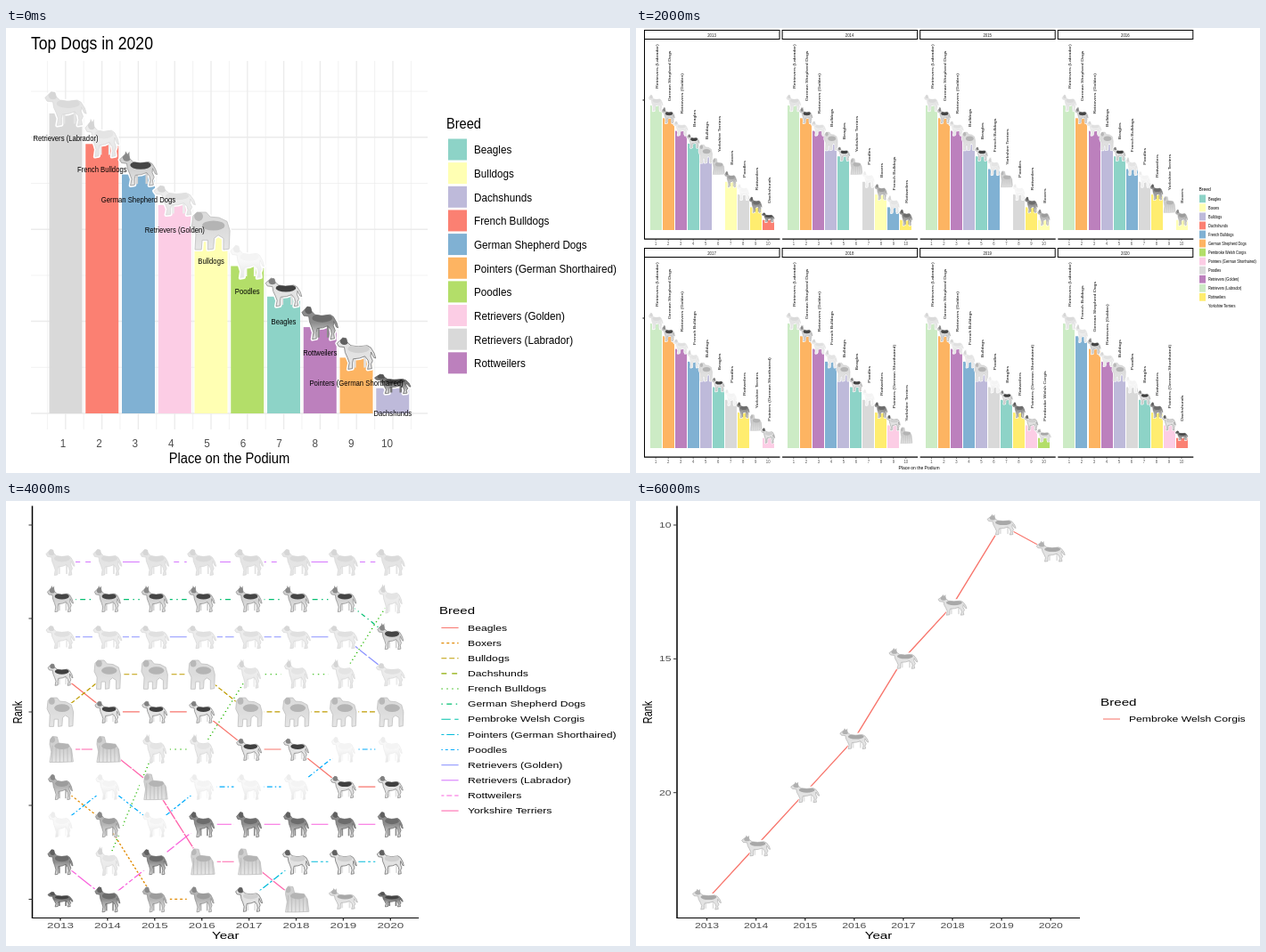
Write an HTML page with a canvas that moves like this. It is 700 px wide and 500 px high and loops after 8 s.

```html
<!DOCTYPE html>
<html lang="en">
<head>
<meta charset="utf-8">
<title>Top Dogs</title>
<style>
html, body { margin: 0; width: 100%; height: 100%; overflow: hidden; background: #fff; }
canvas { display: block; }
</style>
</head>
<body>
<canvas id="stage" width="700" height="500"></canvas>
<script>
const ctx = document.getElementById('stage').getContext('2d');
const GREY = '#4d4d4d';

// outlines in a unit box, facing left
const slim = [[0, .2], [.09, .1], [.15, .03], [.24, .05], [.27, .17], [.36, .27], [.55, .3], [.78, .27], [.87, .33],
  [.96, .5], [1, .66], [.95, .64], [.88, .47], [.87, .6], [.92, .74], [.88, .84], [.9, .98], [.79, 1], [.82, .84],
  [.8, .72], [.72, .6], [.58, .66], [.42, .68], [.4, .8], [.4, .98], [.29, 1], [.32, .8], [.27, .64], [.21, .48],
  [.19, .32], [.05, .3]];
const stocky = [[.05, .12], [.15, .02], [.38, .02], [.48, .14], [.7, .16], [.9, .26], [.97, .5], [.95, .98], [.81, 1],
  [.81, .7], [.68, .62], [.58, .7], [.56, .98], [.42, 1], [.42, .75], [.28, .75], [.26, 1], [.1, 1], [.12, .6], [.02, .4]];
const shaggy = [[.12, .12], [.2, 0], [.38, .02], [.44, .26], [.8, .3], [.92, .5], [.98, .98], [.5, 1], [.1, 1],
  [.16, .6], [.1, .3]];

const breeds = {
  B: { name: 'Beagles', w: 28, h: 25, coat: '#e2e2e2', saddle: '#404040', head: '#808080', line: '#F8766D', dash: '' },
  X: { name: 'Boxers', w: 27, h: 29, coat: '#b4b4b4', saddle: '#9c9c9c', head: '#888', line: '#E18A00', dash: '22' },
  U: { name: 'Bulldogs', w: 31, h: 33, coat: '#dcdcdc', saddle: '#b4b4b4', head: '#b8b8b8', body: stocky, line: '#BE9C00', dash: '42' },
  D: { name: 'Dachshunds', w: 28, h: 17, coat: '#777', saddle: '#444', head: '#555', line: '#8CAB00', dash: '44' },
  F: { name: 'French Bulldogs', w: 26, h: 31, coat: '#ececec', saddle: '#e4e4e4', head: '#d4d4d4', ears: 1, line: '#24B700', dash: '13' },
  G: { name: 'German Shepherd Dogs', w: 29, h: 28, coat: '#d2d2d2', saddle: '#454545', head: '#888', ears: 1, line: '#00BE70', dash: '1343' },
  C: { name: 'Pembroke Welsh Corgis', w: 32, h: 22, coat: '#e2e2e2', saddle: '#a8a8a8', head: '#b0b0b0', ears: 1, line: '#00C1AB', dash: '73' },
  P: { name: 'Pointers (German Shorthaired)', w: 30, h: 28, coat: '#e2e2e2', saddle: '#d0d0d0', head: '#606060', line: '#00BBDA', dash: '2262' },
  O: { name: 'Poodles', w: 26, h: 29, coat: '#f8f8f8', saddle: '#f4f4f4', head: '#ededed', line: '#00ACFC', dash: '12223242' },
  R: { name: 'Retrievers (Golden)', w: 32, h: 26, coat: '#ececec', saddle: '#e0e0e0', head: '#d6d6d6', line: '#8B93FF', dash: 'F282' },
  L: { name: 'Retrievers (Labrador)', w: 32, h: 30, coat: '#e4e4e4', saddle: '#dadada', head: '#d6d6d6', line: '#D575FE', dash: 'F4448444' },
  W: { name: 'Rottweilers', w: 28, h: 29, coat: '#8c8c8c', saddle: '#6c6c6c', head: '#606060', line: '#F962DD', dash: '224282F2' },
  Y: { name: 'Yorkshire Terriers', w: 30, h: 29, coat: '#d0d0d0', saddle: '#b4b4b4', head: '#b8b8b8', body: shaggy, line: '#FF65AC', dash: 'F1' }
};
const keys = Object.keys(breeds);
const set3 = ['#8DD3C7', '#FFFFB3', '#BEBADA', '#FB8072', '#80B1D3', '#FDB462',
  '#B3DE69', '#FCCDE5', '#D9D9D9', '#BC80BD', '#CCEBC5', '#FFED6F'];
// top ten of each year from 2013, best first
const ranking = ['LGRBUYXOWD', 'LGRUBYOXFW', 'LGRUBFYOWX', 'LGRUBFOWYX',
  'LGRFUBOWYP', 'LGRFUBOWPY', 'LGRFUOBWPC', 'LFGRUOBWPD'];

let ky = 1; // height-to-width ratio of type and strokes

function text(s, x, y, size, align = 'left', color = '#000', turn = 0) {
  ctx.save();
  ctx.translate(x, y);
  ctx.scale(1, ky);
  ctx.rotate(turn);
  ctx.font = `${size}px "Liberation Sans", Arial, sans-serif`;
  ctx.textAlign = align;
  ctx.fillStyle = color;
  ctx.fillText(s, 0, size * 0.36);
  ctx.restore();
}

function rect(x, y, w, h, color) {
  ctx.fillStyle = color;
  ctx.fillRect(x, y, w, h);
}

function line(pts, color, width = 1, dash = '') {
  ctx.save();
  ctx.scale(1, ky);
  ctx.strokeStyle = color;
  ctx.lineWidth = width;
  ctx.setLineDash([...dash].map(c => parseInt(c, 16) * width));
  ctx.beginPath();
  pts.forEach(([x, y]) => ctx.lineTo(x, y / ky));
  ctx.stroke();
  ctx.restore();
}

function oval(x, y, rx, ry, color) {
  ctx.fillStyle = color;
  ctx.beginPath();
  ctx.ellipse(x, y, rx, ry, 0, 0, 7);
  ctx.fill();
}

function dog(key, cx, cy, sx = 1, sy = 1, halo = 0) {
  const { coat, saddle, head, ears, body = slim, ...size } = breeds[key];
  const w = size.w * sx, h = size.h * sy;
  const X = u => cx + (u - .5) * w, Y = v => cy + (v - .5) * h;
  const outline = pts => {
    ctx.beginPath();
    pts.forEach(([u, v]) => ctx.lineTo(X(u), Y(v)));
    ctx.closePath();
  };
  ctx.save();
  ctx.lineJoin = 'round';
  if (halo) {
    outline(body);
    ctx.strokeStyle = '#fff';
    ctx.lineWidth = halo;
    ctx.stroke();
  }
  if (body === slim) {
    for (const u of [.43, .69]) rect(X(u), Y(.6), w * .06, h * .35, coat);
  }
  if (ears) {
    outline([[.13, .1], [.16, -.06], [.21, .04], [.26, -.05], [.26, .14]]);
    ctx.fillStyle = head;
    ctx.fill();
  }
  outline(body);
  const shade = ctx.createLinearGradient(0, Y(.5), 0, Y(1));
  shade.addColorStop(0, coat);
  shade.addColorStop(1, '#e6e6e6');
  ctx.fillStyle = shade;
  ctx.fill();
  ctx.strokeStyle = head;
  ctx.lineWidth = .7 * Math.min(1, sx);
  ctx.stroke();
  ctx.clip();
  oval(X(.56), Y(.37), w * .28, h * .13, saddle);
  oval(X(.19), Y(.13), w * .11, h * .12, head);
  if (body === shaggy) {
    for (let u = .2; u < 1; u += .14) line([[X(u), Y(.35)], [X(u * 1.04 - .02), Y(1)]], saddle, .8 * sx);
  }
  ctx.restore();
}

function podium() {
  ky = 1.16;
  const present = keys.filter(k => ranking[7].includes(k));
  const fill = k => set3[present.indexOf(k)];
  for (let i = 0; i < 8; i++) {
    const y = 433 - i * 51.7;
    line([[28, y], [473, y]], '#ebebeb', i % 2 ? .6 : 1.3);
  }
  for (let i = 0; i < 21; i++) {
    const x = 46.4 + i * 20.4;
    line([[x, 37], [x, 451]], '#ebebeb', i % 2 ? 1.3 : .6);
  }
  const mid = i => 67 + i * 40.75;
  [...ranking[7]].forEach((k, i) => {
    const top = 96 + i * 34.3;
    rect(mid(i) - 18.5, top, 37, 433 - top, fill(k));
    text(i + 1, 64 + i * 40.4, 466, 11.7, 'center', GREY);
  });
  [...ranking[7]].forEach((k, i) => dog(k, mid(i), 90 + i * 34.4, 1.45, 1.3, 4));
  [...ranking[7]].forEach((k, i) => text(breeds[k].name, mid(i), 124 + i * 34.35, 7.7, 'center'));
  text('Top Dogs in 2020', 28, 16.5, 17.6);
  text('Place on the Podium', 250.5, 483, 14.7, 'center');
  text('Breed', 494, 107, 14.6);
  present.forEach((k, i) => {
    const y = 136.5 + i * 26.65;
    rect(496, y - 12, 21, 24, fill(k));
    text(breeds[k].name, 525, y, 11.7);
  });
}

function panels() {
  ky = 1.25;
  ranking.forEach((order, n) => {
    const x = 9.5 + n % 4 * 154.6, y = n < 4 ? 2.5 : 247.5;
    const base = y + 224.5;
    ctx.strokeStyle = '#000';
    ctx.lineWidth = 1;
    ctx.strokeRect(x, y, 151.5, 10);
    text(2013 + n, x + 75.5, y + 5.3, 4.3, 'center', '#1a1a1a');
    if (n % 4 == 0) {
      line([[x, y + 10], [x, y + 235]], '#000');
      line([[x - 2, y + 78.5], [x, y + 78.5]], '#333');
    }
    line([[x, y + 234.5], [x + 152, y + 234.5]], '#000');
    const mid = i => x + 12.7 + i * 14;
    const top = i => base - 140 + i * 14.3;
    [...order].forEach((k, i) => {
      rect(Math.round(mid(i) - 6.5), top(i), 13, base - top(i), set3[keys.indexOf(k)] || '#fff');
      line([[mid(i), y + 234.5], [mid(i), y + 236.5]], '#333', .6);
      text(i + 1, mid(i), y + 239.7, 4.2, 'center', GREY);
    });
    [...order].forEach((k, i) => {
      dog(k, mid(i), top(i) - 3, .5, .62, 2);
      text(breeds[k].name, mid(i) + .8, top(i) - 19, 4.2, 'left', '#000', -Math.PI / 2);
    });
  });
  text('Place on the Podium', 317.5, 493.5, 5, 'center');
  text('Breed', 631.5, 181, 5);
  keys.forEach((k, i) => {
    const y = 191.8 + i * 10.05;
    rect(632, y - 4.4, 7, 8.8, set3[i] || '#fff');
    text(breeds[k].name, 642, y, 3.95);
  });
}

function axes(left, right, x0, step, size, yTicks) {
  line([[left, 5.5], [left, 468.5], [right, 468.5]], '#000', 1.5);
  for (let i = 0; i < 8; i++) {
    const x = x0 + i * step;
    line([[x, 468.5], [x, 471.5]], '#333', 1.4);
    text(2013 + i, x, 477, size, 'center', GREY);
  }
  yTicks.forEach(y => line([[left - 4, y], [left, y]], '#333', 1.4));
  text('Year', (left + right) / 2, 488.5, 15.2, 'center');
  text('Rank', 13, 237.5, 15.2, 'center', '#000', -Math.PI / 2);
}

function ranks() {
  ky = .714;
  const X = i => 61 + i * 52.9, Y = r => 68.5 + r * 42.1;
  axes(29.5, 463, 61, 52.9, 13.4, [27, 132, 237, 342, 447.5]);
  text('Breed', 486, 123, 15);
  keys.forEach((k, n) => {
    const { name, line: color, dash } = breeds[k];
    const pts = ranking.map((order, i) => [X(i), Y(order.indexOf(k)), order.includes(k)]).filter(p => p[2]);
    if (k != 'D') line(pts, color, 1.48, dash);
    const y = 142.5 + n * 17.13;
    line([[488.4, y], [507.6, y]], color, 1.48, dash);
    text(name, 518, y, 12.2);
  });
  ranking.forEach((order, i) => [...order].forEach((k, r) => {
    rect(X(i) - 17, Y(r) - 10, 34, 20, '#fff');
    dog(k, X(i), Y(r), 1, 1, 2);
  }));
}

function climb() {
  ky = .714;
  const color = '#F8766D';
  const Y = r => 27 + (r - 10) * 30.07;
  const pts = [24, 22, 20, 18, 15, 13, 10, 11].map((r, i) => [79.5 + i * 55.1, Y(r)]);
  axes(46, 498, 79.5, 55.1, 12.2, [10, 15, 20].map(Y));
  [10, 15, 20].forEach(r => text(r, 39.5, Y(r), 12.2, 'right', GREY));
  line(pts, color, 1.48);
  pts.forEach(([x, y]) => {
    rect(x - 17, y - 7, 34, 14, '#fff');
    dog('C', x, y, 1, 1, 2);
  });
  text('Breed', 521, 226, 15.2);
  line([[524, 245], [543, 245]], color, 1.48);
  text(breeds.C.name, 553, 245, 12.15);
}

const scenes = [podium, panels, ranks, climb];
let shown = -1;
function frame() {
  const now = Math.floor(performance.now() % 8000 / 2000);
  if (now !== shown) {
    shown = now;
    rect(0, 0, 700, 500, '#fff');
    scenes[now]();
  }
  requestAnimationFrame(frame);
}
frame();
</script>
</body>
</html>
```
